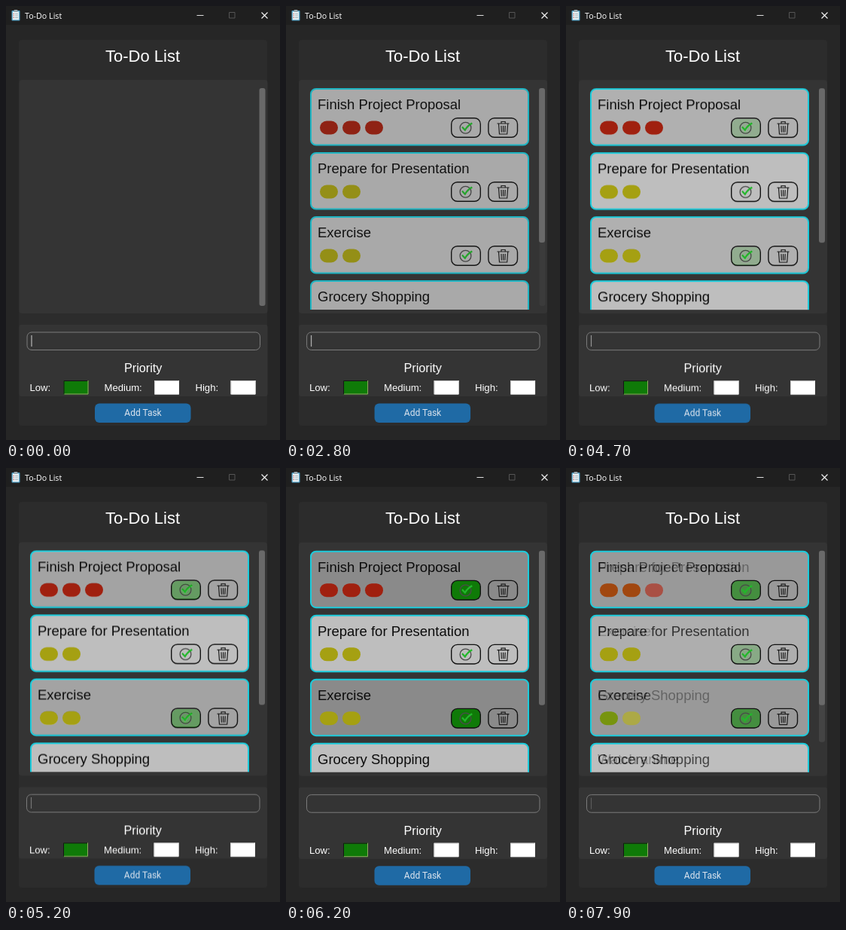
These frames come from a looping animation (364x576 px, 8 s). An HTML page:

```html
<!DOCTYPE html>
<html lang="en">
<head>
<meta charset="utf-8">
<title>To-Do List</title>
<style>
  html, body { margin: 0; width: 100%; height: 100%; overflow: hidden; background: #242424; }
  svg { display: block; width: 364px; height: 576px; }
  text { font-family: "Liberation Sans", Arial, sans-serif; fill: #fff; }
  .bar { font: 500 10.7px "Open Sans", "Noto Sans", sans-serif; }
  .btn { font: 12px Roboto, sans-serif; fill: #dce4ee; }
  .task { font-size: 18.5px; fill: #0c0c0c; }
  .line { fill: none; stroke: #1c1c1c; stroke-width: 1.2; }
</style>
</head>
<body>
<svg id="stage" viewBox="0 0 364 576"></svg>
<script>
const HOLD = 1200, STEP = 100, STEPS = 20, LOOP = 8000;
const SPAN = HOLD + (STEPS - 1) * STEP;
const RED = '#a0200f', YELLOW = '#a5a012', GREEN = '#0f7a08';

const task = (title, color, level, done = false) => ({ title, color, level, done });
const proposal = done => task('Finish Project Proposal', RED, 3, done);
const talk = task('Prepare for Presentation', YELLOW, 2);
const exercise = done => task('Exercise', YELLOW, 2, done);
const shopping = task('Grocery Shopping', GREEN, 1);
const anime = task('Watch anime', GREEN, 1);

const scenes = [
  { tasks: [], thumb: 289, dx: .5, dy: 0, caret: true },
  { tasks: [proposal(), talk, exercise(), shopping], thumb: 205, dx: 0, dy: 0, caret: true },
  { tasks: [proposal(true), talk, exercise(true), shopping], thumb: 205, dx: 0, dy: .7, caret: false },
  { tasks: [talk, exercise(true), shopping, anime], thumb: 254, dx: 0, dy: .7, caret: true }
];

const rect = (x, y, w, h, fill, r = 0, extra = '') =>
  `<rect x="${x}" y="${y}" width="${w}" height="${h}" fill="${fill}" rx="${r}" ${extra}/>`;
const text = (x, y, s, size, cls = '') =>
  `<text x="${x}" y="${y}" class="${cls}" ${size ? `font-size="${size}"` : ''}>${s}</text>`;
const path = (d, color, width) =>
  `<path d="${d}" fill="none" stroke="${color}" stroke-width="${width}"/>`;

const titleBar = () =>
  rect(0, 0, 364, 25, '#1f1f1f') +
  rect(7.5, 6, 11, 13.5, '#4f9fc4', 1) + rect(8.8, 7.5, 8.4, 10.8, '#e9f1f4') +
  rect(10.5, 5, 5, 3, '#9aa6ad', 1) +
  path('M12 10.5h4M12 13h4M12 15.5h4', '#8fa3ad', .8) +
  path('M9.6 10.5h1.4M9.6 13h1.4M9.6 15.5h1.4', '#c0504d', 1) +
  text(25, 16.5, 'To-Do List', 0, 'bar') +
  path('M253.5 12.5h9', '#ddd', 1) +
  path('M296.5 8.5h7.5v7.5h-7.5z', '#555', 1) +
  path('M339.5 8.5l8 8m0-8l-8 8', '#eee', 1.2);

function card(t, i) {
  let s = rect(33, 110, 289, 74.5, t.done ? '#8a8a8a' : '#bebebe', 7,
    'stroke="#1cccdc" stroke-width="2"') + text(42, 137.3, t.title, 0, 'task');
  for (let k = 0; k < t.level; k++) s += rect(45 + 30 * k, 152.5, 24, 18, t.color, 9);
  const frame = 'stroke="#111" stroke-width="1.4"';
  s += rect(219.7, 148.7, 38.6, 25.6, t.done ? GREEN : 'none', 8, frame) +
    rect(268.9, 148.7, 38.6, 25.6, 'none', 8, frame) +
    `<circle cx="238.5" cy="161.8" r="7.4" fill="none" stroke="#4a4a4a" stroke-width="1.3"/>` +
    path('M234 160.5l3.8 4.2q3.5-6 9.5-9.2', '#22b82a', 2.2) +
    `<path class="line" d="M280.5 156h16M286 155.5v-2h5.2v2M282.5 156.5l1 13.5h10.2l1-13.5M286 159l.4 8.5M288.6 159v8.5M291.2 159l-.4 8.5"/>`;
  return `<g transform="translate(0 ${85 * i})">${s}</g>`;
}

const swatch = (x, fill) => rect(x, 497, 33, 18.5, fill) +
  path(`M${x + .5} 515v-17.5h32`, fill === GREEN ? '#141414' : '#cfcfcf', 1) +
  path(`M${x + 1} 515h31.5v-18`, fill === GREEN ? '#8fa860' : '#f4f4f4', 1);

const form = caret =>
  rect(27.5, 433, 309.5, 23.5, '#343434', 6, 'stroke="#7c7c7c"') +
  (caret ? path('M33.5 437v15', '#b8b8b8', 1.2) : '') +
  text(156.5, 486, 'Priority', 16.2) +
  text(31, 511, 'Low:', 13.1) + swatch(76, GREEN) +
  text(130, 511, 'Medium:', 13.1) + swatch(196.5, '#fff') +
  text(251, 511, 'High:', 13.1) + swatch(298, '#fff') +
  rect(117.5, 527.5, 127.5, 25.5, '#1f6aa5', 6) +
  text(156.8, 544, 'Add Task', 0, 'btn');

const scene = ({ tasks, thumb, dx, dy, caret }) =>
  `<g>${rect(0, 0, 364, 576, '#262626')}${titleBar()}
    ${rect(17, 45, 330, 512, '#2c2c2c', 4)}${text(132, 74, 'To-Do List', 22)}
    <g transform="translate(${dx} ${dy})">
      ${rect(17, 98, 330, 310, '#343434', 4)}${rect(17, 423, 330, 95, '#343434', 3)}
      <g clip-path="url(#view)">${tasks.map(card).join('')}</g>
      ${rect(336, 109, 8, thumb, '#696969', 3)}${form(caret)}
    </g></g>`;

const stage = document.getElementById('stage');
stage.innerHTML = '<clipPath id="view"><path d="M17 98h318v305H17z"/></clipPath>' +
  scenes.map(scene).join('');
const layers = stage.querySelectorAll(':scope > g');

// Each scene holds, then the next one dissolves over it in equal steps.
function draw(now) {
  const t = now % LOOP, current = Math.floor(t / SPAN);
  const step = Math.floor((t % SPAN - HOLD) / STEP) + 1;
  const mix = Math.max(0, step / STEPS);
  layers.forEach((g, i) => {
    g.style.display = i === current || (i === current + 1 && mix) ? '' : 'none';
    g.style.opacity = i === current ? 1 : mix;
  });
}

const start = performance.now();
function tick() {
  draw(performance.now() - start);
  requestAnimationFrame(tick);
}
tick();
</script>
</body>
</html>
```
